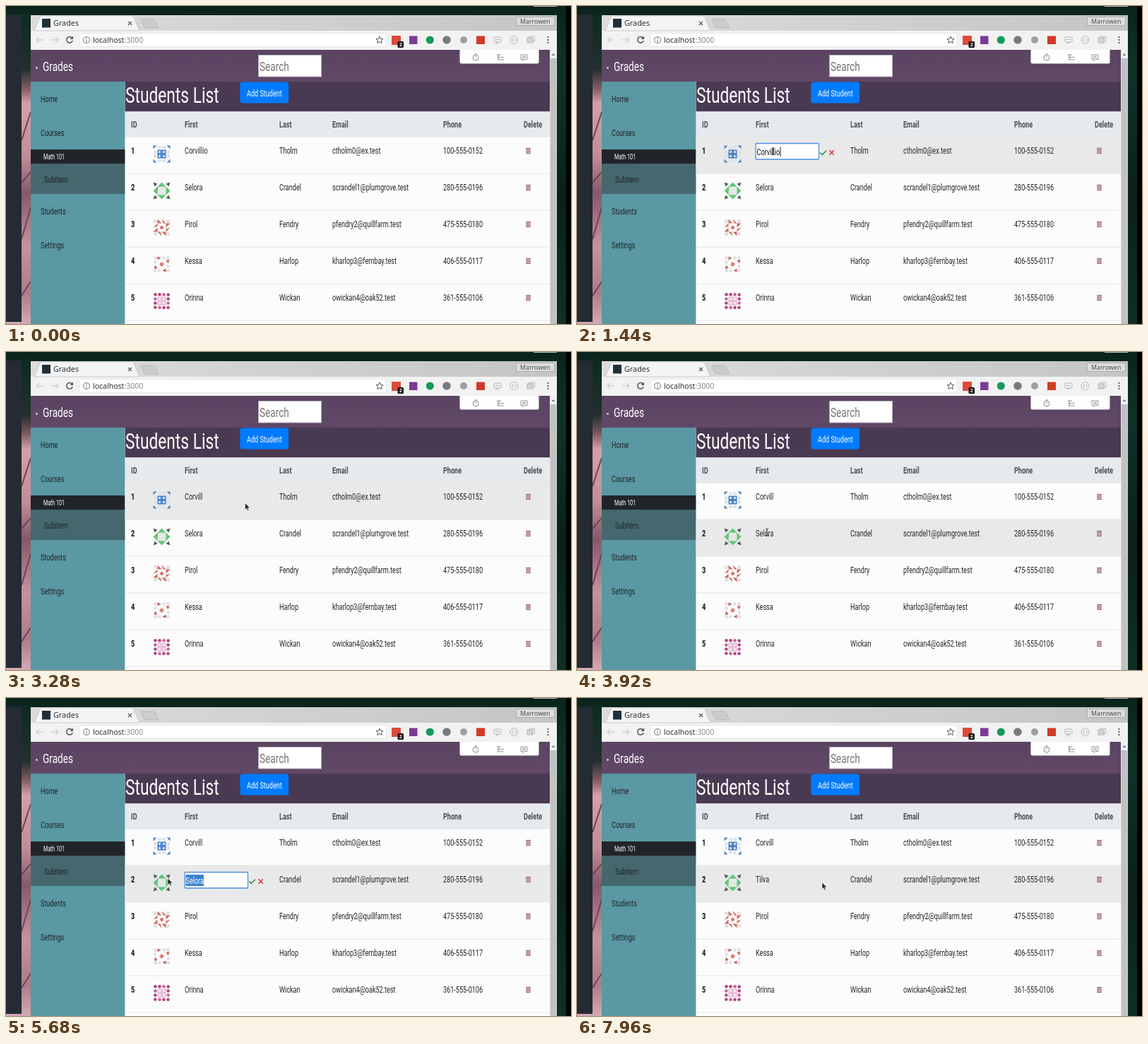
These frames come from a looping animation (800 px wide and 450 px high, 8 s). An HTML page:

```html
<!DOCTYPE html>
<html lang="en">
<head>
<meta charset="utf-8">
<title>Grades</title>
<style>
  html, body { margin: 0; width: 100%; height: 100%; overflow: hidden; background: #0a211b; }
  svg { display: block; width: 800px; height: 450px; }
  text { white-space: pre; }
  .app { font-family: Roboto, sans-serif; }
  .chrome { font-family: "Noto Sans", sans-serif; }
</style>
</head>
<body>
<svg id="stage" viewBox="0 0 800 450">
  <defs>
    <linearGradient id="wall" x2="0" y2="1">
      <stop offset="0" stop-color="#0d2a23"/><stop offset=".18" stop-color="#22302d"/>
      <stop offset=".24" stop-color="#7d5a60"/><stop offset=".29" stop-color="#d3a0a9"/>
      <stop offset=".46" stop-color="#c08d98"/><stop offset=".58" stop-color="#85596a"/>
      <stop offset=".75" stop-color="#c5929f"/><stop offset=".9" stop-color="#ac7c8a"/>
      <stop offset="1" stop-color="#d3aab3"/>
    </linearGradient>
    <linearGradient id="leaf" x2="0" y2="1">
      <stop offset="0" stop-color="#0a231c"/><stop offset=".2" stop-color="#0e3428"/>
      <stop offset=".6" stop-color="#09211b"/><stop offset="1" stop-color="#0e3026"/>
    </linearGradient>
    <linearGradient id="bar" x2="0" y2="1">
      <stop offset="0" stop-color="#5a4462"/><stop offset="1" stop-color="#614867"/>
    </linearGradient>
    <linearGradient id="tabs">
      <stop offset="0" stop-color="#dcdcdc"/><stop offset="1" stop-color="#c4c5c5"/>
    </linearGradient>
  </defs>
  <g id="scene"></g>
  <g id="live"></g>
</svg>
<script>
const LOOP = 8000, CONDENSE = 0.71, ROW_TOP = 185, ROW_H = 52;
const $ = id => document.getElementById(id);

const rect = (x, y, w, h, fill, more = '') =>
  `<rect x="${x}" y="${y}" width="${w}" height="${h}" fill="${fill}" ${more}/>`;
const dot = (x, y, r, fill, more = '') => `<circle cx="${x}" cy="${y}" r="${r}" fill="${fill}" ${more}/>`;
const line = (d, stroke, width = 1, more = '') =>
  `<path d="${d}" fill="none" stroke="${stroke}" stroke-width="${width}" ${more}/>`;
const shape = (d, fill, more = '') => `<path d="${d}" fill="${fill}" ${more}/>`;

// The page uses one condensed face throughout.
const appText = (x, y, s, { size = 12.8, fill = '#212529', weight = 400, id = '' } = {}) =>
  `<text class="app" id="${id}" transform="translate(${x} ${y}) scale(${CONDENSE} 1)" ` +
  `font-size="${size}" font-weight="${weight}" fill="${fill}">${s}</text>`;
const chromeText = (x, y, s, size, fill, more = '') =>
  `<text class="chrome" x="${x}" y="${y}" font-size="${size}" fill="${fill}" ${more}>${s}</text>`;

const students = [
  ['Corvillio', 'Tholm', 'ctholm0@ex.test', '100-555-0152'],
  ['Selora', 'Crandel', 'scrandel1@plumgrove.test', '280-555-0196'],
  ['Pirol', 'Fendry', 'pfendry2@quillfarm.test', '475-555-0180'],
  ['Kessa', 'Harlop', 'kharlop3@fernbay.test', '406-555-0117'],
  ['Orinna', 'Wickan', 'owickan4@oak52.test', '361-555-0106'],
];

// Each avatar is one quarter turned four times about its centre.
const pale = '#dfe0e4';
const quarters = [
  shape('M-12-7L-7-12H-12Z', '#4a86c8') + dot(-3, -9.3, 2.4, pale) + dot(3, -9.3, 2.4, pale) +
    rect(-6, -6, 6.2, 6.2, '#3f7fc9') + shape('M-3-5L-1-3L-3-1L-5-3Z', '#e3edf8'),
  shape('M-12-12L-6-10L-10-6Z', '#555a5c') + shape('M0-12L6.5-5.5H-6.5Z', '#5fc774') +
    rect(-6, -6, 6, 6, '#e4e6e4'),
  dot(-9, -9, 2.6, pale) + shape('M-6-12V-6H0Z', '#cf6a60') +
    shape('M0-12L6-6H2Z', '#cf6a60') + shape('M-3 0L0-3V0Z', '#c9564f'),
  dot(-9, -9, 2.5, pale) + dot(3, -9, 2.3, pale) + shape('M-6-6V-11L-1-9Z', '#c4604f') +
    shape('M-3.5 0L0-3.5V0Z', '#d4685a'),
  [-9, -3, 3].map(x => dot(x, -9.2, 2.3, x < 0 ? '#b0477f' : '#c56598')).join('') +
    rect(-5.4, -5.4, 4.8, 4.8, '#fbeaf3', 'stroke="#dda0c2"'),
];
const avatar = i => `<g transform="translate(220.5 ${ROW_TOP + i * ROW_H + 24.5})">` +
  [0, 90, 180, 270].map(a => `<g transform="rotate(${a})">${quarters[i]}</g>`).join('') + '</g>';

const trash = y => rect(737, y - 2, 5, 5.6, '#ecd8da', 'stroke="#8a4753" stroke-width=".9"') +
  line(`M736 ${y - 3.6}H743M738.2 ${y - .5}L740.8 ${y + 2}M740.8 ${y - .5}L738.2 ${y + 2}`, '#8a4753', .9);

function desktop() {
  return rect(0, 0, 800, 450, 'url(#leaf)') + rect(22, 10, 14, 440, 'url(#wall)') +
    line('M22 190L35 150M22 250L35 235M22 330L35 285M22 410L35 390', '#6d4655', 2) +
    rect(0, 12, 22, 435, '#252a35') + rect(0, 447, 22, 3, '#d3aab3') +
    rect(747, 0, 33, 1, '#b9bfbd') + rect(793, 0, 7, 450, '#000');
}

function browser() {
  const grey = '#6b6e70', light = '#b4b6b8';
  return rect(35, 13, 745, 437, '#f2f2f2', 'rx="2"') + rect(35, 13, 745, 22, 'url(#tabs)') +
    shape('M40 35L48 16Q49 14 52 14H177Q180 14 181 16L189 35Z', '#f4f4f4', 'stroke="#b9bbbb" stroke-width=".7"') +
    rect(51, 18, 12, 12.5, '#20303a') + chromeText(67, 28, 'Grades', 10.8, '#2e3436') +
    line('M173 22L178 27M178 22L173 27', '#555', 1.1) +
    shape('M191 19H208Q210 19 211 21L216 31H198Q196 31 195 29Z', '#cbcccc', 'stroke="#adafaf" stroke-width=".7"') +
    rect(722.5, 15.5, 54, 12, '#dcdddd', 'stroke="#a4a7a7" stroke-width=".8"') +
    chromeText(728, 25, 'Marrowen', 8.8, '#4a4d4f', 'font-weight="500"') +
    line('M53 48H43M47 44L43 48L47 52M64 48H74M70 44L74 48L70 52', '#cfcfcf', 1.3) +
    line('M93.5 45.2A4.3 4.3 0 1 0 94.2 49', '#505355', 1.5) + shape('M95 42.5V47H90.5Z', '#505355') +
    rect(104, 38.5, 434, 19, '#fff', 'rx="2" stroke="#e2e2e2" stroke-width=".8"') +
    dot(114, 48, 4.4, 'none', `stroke="${grey}"`) + line('M114 47.4V50.5M114 45.3V46.4', grey, 1.1) +
    chromeText(123, 52, 'localhost<tspan fill="#85888a">:3000</tspan>', 10.5, '#2b2e30') +
    shape('M529 43L530.5 46.4L534 46.7L531.4 49L532.2 52.5L529 50.6L525.8 52.5L526.6 49L524 46.7L527.5 46.4Z',
      'none', 'stroke="#555" stroke-linejoin="round"') +
    rect(546, 42, 13, 13, '#dd4b39') + rect(554.5, 50, 8.5, 9, '#111', 'rx="1.5"') +
    chromeText(556.7, 57.3, '2', 7, '#fff', 'font-weight="700"') +
    rect(571, 42.5, 11.5, 11.5, '#7c3a96') + dot(600.3, 48, 5.6, '#149a5b') +
    dot(624, 48, 5.8, '#777b7e') + dot(648, 48, 5, '#9aa0a3') + rect(666, 42.5, 12, 11.5, '#cf3b26') +
    rect(691, 44, 10, 7, 'none', `stroke="${light}" rx="1"`) + line('M693 47.5H699M695 51L694 53.5L698 51', light) +
    dot(719.5, 48, 5.5, 'none', `stroke="${light}"`) + line('M718 45.5Q716 48 718 50.5M721 45.5Q723 48 721 50.5', light) +
    rect(738, 45, 8, 7, '#d3d4d5', `stroke="${light}"`) + line('M741 45V43H748.5V50H746', light) +
    [44, 48, 52].map(y => dot(767.5, y, 1.15, '#5b5e60')).join('');
}

function sidebar() {
  return rect(35, 107, 133.6, 343, '#5a98a3') + rect(35, 203, 133.6, 20.5, '#212529') +
    rect(35, 223.5, 133.6, 42.5, '#45686e') +
    [['Home', 136], ['Courses', 184], ['Students', 294.5], ['Settings', 342.5]]
      .map(([s, y]) => appText(49, y, s)).join('') +
    appText(53, 216.5, 'Math 101', { size: 10, fill: '#fff' }) + appText(54, 249.5, 'Subitem');
}

function page() {
  const tool = '#8a8a8a';
  return rect(35, 62, 735, 45, 'url(#bar)') + dot(43.5, 87.5, 1.2, '#fff') +
    appText(52, 92.3, 'Grades', { size: 19.2, fill: '#fff' }) +
    rect(357.5, 69.5, 89, 30.5, '#fff', 'stroke="#b5aeb9"') +
    appText(359, 92.3, 'Search', { size: 19.2, fill: '#757575' }) +
    rect(168.6, 107, 601.4, 42.4, '#4a3952') + sidebar() +
    appText(169, 136.5, 'Students List', { size: 32, fill: '#fff' }) +
    rect(331.4, 107.6, 68.8, 30, '#007bff', 'rx="3.5"') + appText(341, 127.5, 'Add Student', { fill: '#fff' }) +
    shape('M642.5 62H754.5V79Q754.5 81.5 752 81.5H645Q642.5 81.5 642.5 79Z', '#fff') +
    dot(665, 73, 4, 'none', `stroke="${tool}"`) + line('M663.5 67.8H666.5M665 73V70.5', tool) +
    line('M695 69H701M697 69V76H700M697 72.5H700M700.5 72.5H704.5M700.5 76H704.5', tool, 1.2) +
    line('M729 69H738V75.5H734L732 77.5V75.5H729ZM731 71.4H736M731 73.4H736', tool, .9) +
    rect(770, 62, 10, 388, '#f1f1f1') + shape('M772.5 70L775 67L777.5 70Z', '#777') +
    rect(770.5, 74, 9, 376, '#c1c1c1');
}

function table() {
  const heads = [['ID', 177], ['First', 253], ['Last', 387], ['Email', 462], ['Phone', 619], ['Delete', 733]];
  let out = rect(168.6, 149.4, 601.4, 36, '#e6eaed') + rect(168.6, 185, 601.4, 265, '#fcfcfc') +
    heads.map(([s, x]) => appText(x, 172, s, { weight: 600, fill: '#495057' })).join('') +
    rect(168.6, 0, 601.4, ROW_H, '#e9e9e9', 'id="hover"');
  students.forEach(([first, last, email, phone], i) => {
    const top = ROW_TOP + i * ROW_H, y = top + 23.5;
    out += appText(177, y, i + 1, { weight: 800 }) + avatar(i) + appText(253, y, first, { id: 'name' + i }) +
      appText(387, y, last) + appText(462, y, email) + appText(619, y, phone) + trash(top + 20);
  });
  for (let i = 0; i < 6; i++) out += rect(168.6, ROW_TOP + i * ROW_H - .5, 601.4, 1, '#e4e7ea');
  return out;
}

$('scene').innerHTML = desktop() + browser() + page() + table();
$('live').innerHTML =
  `<g id="editor">${rect(253, 9.5, 89.5, 22.5, '#fff', 'rx="1" stroke="#4c8fe0" stroke-width="1.3"')}` +
  rect(254, 13, 0, 16, '#3a82cf', 'id="selection"') + appText(254.5, 26, '', { id: 'field', fill: '#111' }) +
  rect(0, 14.5, .9, 13.5, '#111', 'id="caret"') +
  line('M344.5 22.5L347.3 25.5L353 19.8', '#218838', 1.5) +
  line('M357.5 19.3L363.8 25.8M363.8 19.3L357.5 25.8', '#d9352b', 1.5) + '</g>' +
  shape('M0 0V9.6L2.2 7.6L3.8 11L5.4 10.2L3.9 6.9H6.8Z', '#222', 'id="arrow" stroke="#fff" stroke-width=".6"') +
  `<g id="beam">${line('M-2-5Q0-5 0-3.5Q0-5 2-5M0-4V4M-2 5Q0 5 0 3.5Q0 5 2 5', '#333', 1)}</g>`;

const pointer = [
  [120, 330, 456], [540, 301, 201], [800, 301, 201], [1080, 276, 205], [1400, 276, 205],
  [1720, 317, 222], [2520, 317, 222], [2860, 348, 208], [3160, 348, 208], [3720, 269, 255],
  [4560, 269, 255], [4800, 288, 258], [4960, 288, 258], [5440, 229, 255], [6500, 229, 255],
  [6840, 308, 227], [7040, 308, 227], [7360, 348, 259], [7600, 348, 259], [7760, 347, 261],
];
const edits = [
  { row: 0, from: 1240, to: 3000, after: 'Corvill', steps: [[1240, 'Corvillio'], [1700, 'Corvilli'], [1900, 'Corvill']] },
  { row: 1, from: 4400, to: 7480, after: 'Tilva', drag: [4960, 5880],
    steps: [[4400, 'Selora'], ...[1, 2, 3, 4, 5].map(n => [5740 + n * 140, 'Tilva'.slice(0, n)])] },
];

function pointerAt(t) {
  const next = pointer.findIndex(p => p[0] > t);
  if (next < 0) return pointer.at(-1).slice(1);
  const [t0, x0, y0] = pointer[next - 1], [t1, x1, y1] = pointer[next];
  const p = (t - t0) / (t1 - t0), ease = p * p * (3 - 2 * p);
  return [x0 + (x1 - x0) * ease, y0 + (y1 - y0) * ease];
}
const show = (id, on) => $(id).setAttribute('visibility', on ? 'visible' : 'hidden');

function drawEditor(edit, t, x) {
  const [keyTime, value] = edit.steps.findLast(s => s[0] <= t);
  $('editor').setAttribute('transform', `translate(0 ${ROW_TOP + edit.row * ROW_H})`);
  $('field').textContent = value;
  const end = 254.5 + $('field').getComputedTextLength() * CONDENSE;
  const selecting = edit.drag && t >= edit.drag[0] && t < edit.drag[1];
  const start = selecting ? Math.min(end, Math.max(254.5, x)) : end;
  $('selection').setAttribute('x', start);
  $('selection').setAttribute('width', end - start);
  $('field').setAttribute('fill', start < 258 ? '#fff' : '#111');
  $('caret').setAttribute('x', end + .4);
  return !selecting && (t - keyTime) % 1000 < 500;
}

function draw(t) {
  const visible = t >= pointer[0][0];
  const [x, y] = visible ? pointerAt(t) : [0, 0];
  const edit = edits.find(e => t >= e.from && t < e.to);
  show('editor', edit);
  show('selection', edit);
  show('caret', edit && drawEditor(edit, t, x));

  students.forEach(([first], i) => {
    const done = edits.find(e => e.row === i && t >= e.to);
    $('name' + i).textContent = done ? done.after : first;
    show('name' + i, !edit || edit.row !== i);
  });

  const under = Math.floor((y - ROW_TOP) / ROW_H), row = edit ? edit.row : under;
  show('hover', visible && row >= 0);
  $('hover').setAttribute('y', ROW_TOP + row * ROW_H);

  const inRow = y - ROW_TOP - under * ROW_H;
  const overText = edit && edit.row === under
    ? x > 253 && x < 342 && inRow > 9 && inRow < 32
    : x > 253 && x < 290 && inRow > 10 && inRow < 28;
  show('beam', visible && overText);
  show('arrow', visible && !overText);
  for (const id of ['beam', 'arrow']) $(id).setAttribute('transform', `translate(${x} ${y})`);
}

const startTime = performance.now();
function tick() {
  draw((performance.now() - startTime) % LOOP);
  requestAnimationFrame(tick);
}
tick();
</script>
</body>
</html>
```
